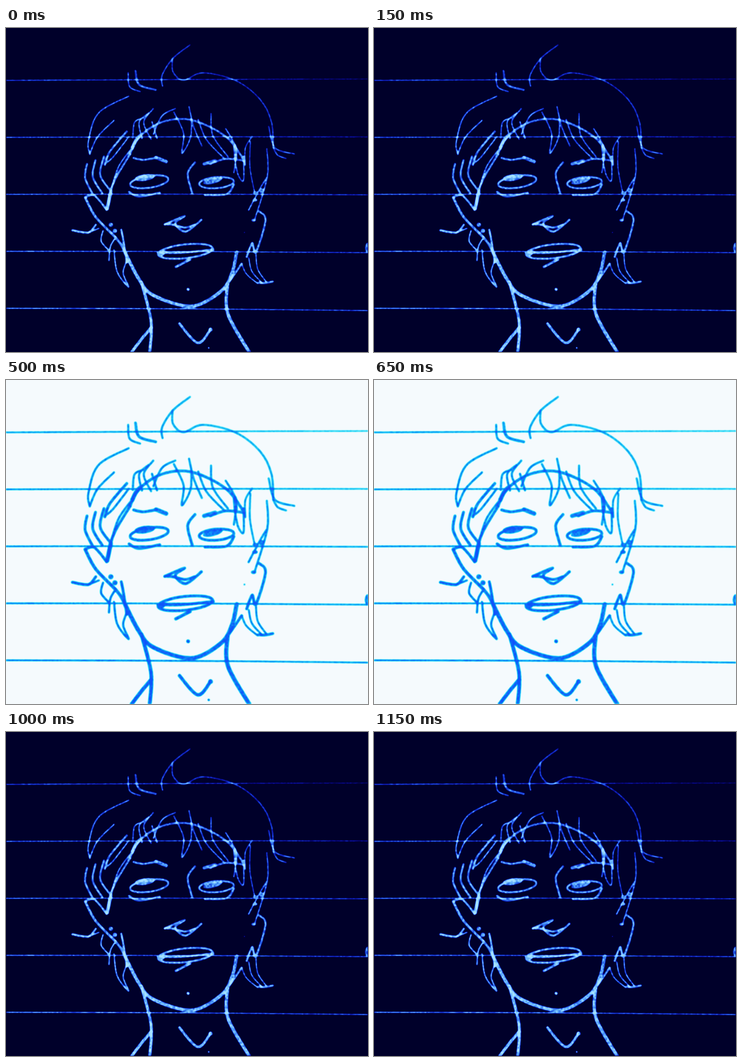
An HTML page with a canvas that plays this animation: 791x708 px, repeating every 1250 ms.

```html
<!DOCTYPE html>
<html lang="en">
<head>
<meta charset="utf-8">
<title>Ink portrait</title>
<style>
html, body { margin: 0; width: 100%; height: 100%; overflow: hidden; background: #00002a; }
canvas { display: block; width: 791px; height: 708px; }
</style>
</head>
<body>
<canvas id="stage" width="791" height="708"></canvas>
<script>
const W = 791, H = 708, BEAT = 250;
const FINE = 4.5, MEDIUM = 6, BOLD = 9;
const lerp = (a, b, t) => a + (b - a) * t;

function sheet() {
  const c = document.createElement('canvas');
  c.width = W;
  c.height = H;
  return c.getContext('2d');
}

// The ink is pale at the top right and strong at the bottom left
const pen = sheet();
const tone = pen.createLinearGradient(600, 60, 250, 640);
tone.addColorStop(0, 'rgba(255,255,255,.58)');
tone.addColorStop(0.3, 'rgba(255,255,255,.78)');
tone.addColorStop(1, 'rgba(255,255,255,.93)');
pen.strokeStyle = pen.fillStyle = tone;
pen.lineCap = pen.lineJoin = 'round';

// Smooth stroke through a few points: x, y, x, y, ...
function ink(width, ...xy) {
  const last = xy.length / 2 - 1;
  const at = i => xy.slice(2 * Math.max(0, Math.min(last, i))).slice(0, 2);
  pen.lineWidth = width;
  pen.beginPath();
  pen.moveTo(...at(0));
  for (let i = 0; i < last; i++) {
    const [a, b, c, d] = [at(i - 1), at(i), at(i + 1), at(i + 2)];
    pen.bezierCurveTo(
      b[0] + (c[0] - a[0]) / 6, b[1] + (c[1] - a[1]) / 6,
      c[0] - (d[0] - b[0]) / 6, c[1] - (d[1] - b[1]) / 6, c[0], c[1]);
  }
  pen.stroke();
}

// Strands spread evenly between two strokes
function fan(n, width, from, to) {
  for (let i = 0; i < n; i++) {
    ink(width, ...from.map((v, k) => lerp(v, to[k], i / (n - 1))));
  }
}

function oval(x, y, rx, ry, turn = 0) {
  pen.beginPath();
  pen.ellipse(x, y, rx, ry, turn, 0, Math.PI * 2);
}

function blot(x, y, rx, ry = rx, turn = 0) {
  oval(x, y, rx, ry, turn);
  pen.fill();
}

function ring(...shape) {
  oval(...shape);
  pen.lineWidth = MEDIUM;
  pen.stroke();
}

function drawRules() {
  for (let i = 0; i < 5; i++) {
    const y = 114.5 + 124.5 * i;
    ink(3.4, 0, y, 400, y - 2 + 0.8 * i, W, y - 3 + 2 * i);
  }
}

function drawCrown() {
  ink(FINE, 402, 37, 364, 67, 341, 104, 342, 127);
  ink(FINE, 364, 67, 365, 96, 388, 114, 430, 98, 502, 115, 556, 157, 580, 205, 584, 261);
  ink(FINE, 574, 215, 588, 262, 630, 275);
  ink(FINE, 584, 262, 594, 278, 612, 285);
  ink(FINE, 267, 98, 270, 128, 293, 139);
  ink(MEDIUM, 283, 94, 291, 124, 327, 135);
  ink(FINE, 268, 149, 202, 186, 180, 248, 183, 276);
  ink(FINE, 236, 202, 200, 238, 183, 276);
}

function drawFringe() {
  ink(MEDIUM, 271, 276, 290, 239, 340, 206, 405, 201, 480, 237, 521, 290);
  fan(3, FINE, [300, 196, 281, 206, 277, 240], [322, 176, 301, 206, 317, 243]);
  ink(FINE, 319, 205, 325, 225, 330, 241);
  ink(FINE, 370, 176, 341, 192, 322, 232);
  ink(FINE, 367, 184, 388, 230, 384, 274, 403, 240, 405, 200);
  fan(2, FINE, [400, 172, 410, 215, 428, 258], [420, 200, 438, 244, 478, 286]);
  fan(2, FINE, [448, 187, 452, 235, 485, 281], [480, 220, 502, 262, 498, 316]);
  ink(FINE, 500, 285, 507, 320, 519, 333, 519, 280);
  ink(BOLD, 292, 236, 283, 247, 276, 262);
  ink(BOLD, 500, 258, 502, 282);
}

function drawLeftHair() {
  fan(2, MEDIUM, [264, 226, 227, 270, 216, 299], [271, 276, 235, 338, 220, 397]);
  ink(FINE, 268, 238, 234, 282, 216, 297);
  ink(FINE, 275, 262, 246, 303, 229, 355);
  fan(3, MEDIUM, [177, 297, 173, 328, 190, 364], [214, 281, 206, 322, 230, 357]);
  ink(MEDIUM, 173, 370, 193, 366, 220, 397);
  ink(BOLD, 229, 357, 221, 395);
  ink(MEDIUM, 145, 442, 180, 447, 196, 430);
  ink(FINE, 182, 446, 203, 438);
  ink(FINE, 212, 443, 208, 466, 226, 487);
  ink(FINE, 240, 457, 228, 478, 225, 508);
  ink(FINE, 236, 485, 243, 533, 268, 566, 256, 536, 263, 510);
  ink(MEDIUM, 252, 441, 256, 462, 264, 512);
  blot(229, 430, 5.5);
  blot(238, 443, 5.5);
}

function drawRightHair() {
  fan(2, 4, [538, 237, 523, 262, 523, 300], [534, 248, 533, 304, 543, 358]);
  fan(3, 4, [515, 515, 525, 537, 548, 557], [546, 490, 550, 527, 570, 556]);
  ink(FINE, 570, 264, 571, 325, 543, 420);
  ink(FINE, 569, 328, 556, 349, 530, 398);
  ink(MEDIUM, 552, 400, 567, 420, 546, 490, 538, 470, 526, 500);
  ink(MEDIUM, 550, 557, 568, 557, 583, 554);
  blot(545, 360, 6, 4);
  blot(559, 356, 6);
  blot(544, 376, 6, 4);
  blot(541, 420, 6, 4);
}

function drawEyes() {
  ink(MEDIUM, 279, 284, 300, 288, 330, 283);
  ink(BOLD, 328, 283, 350, 292);
  ink(BOLD, 433, 297, 457, 290);
  ink(MEDIUM, 446, 297, 480, 286, 521, 290);
  ring(313, 336, 42, 13, -0.15);
  ring(460, 338, 38, 12, -0.08);
  blot(303, 327, 23, 8, -0.15);
  blot(452, 334, 22, 7, -0.25);
  ink(MEDIUM, 269, 358, 290, 368, 336, 360);
  ink(MEDIUM, 498, 342, 482, 363, 435, 365);
  ink(MEDIUM, 413, 294, 397, 318, 407, 361);
}

function drawMouth() {
  ink(MEDIUM, 347, 429, 390, 411, 370, 427, 393, 445, 427, 419);
  ink(MEDIUM, 347, 429, 365, 430, 392, 436, 412, 430);
  ring(392, 488, 60, 15, -0.11);
  ink(MEDIUM, 332, 491, 385, 491, 453, 484);
  blot(339, 493, 8, 6);
  ink(7, 371, 522, 402, 506);
  blot(398, 571, 4);
}

function drawJaw() {
  ink(7, 173, 370, 196, 413, 243, 462, 261, 491);
  ink(BOLD, 260, 490, 290, 548, 322, 584, 405, 608, 470, 575, 494, 535, 504, 490);
  ink(MEDIUM, 515, 515, 488, 554);
  ink(BOLD, 484, 560, 485, 625, 532, 709);
  ink(8, 296, 556, 317, 640, 314, 709);
  ink(8, 317, 655, 296, 680, 274, 709);
  ink(7, 379, 646, 419, 688, 447, 659);
  blot(447, 659, 5);
  blot(791, 480, 7, 12);
  blot(443, 699, 2.5);
  blot(521, 447, 2);
}

[drawRules, drawCrown, drawFringe, drawLeftHair, drawRightHair,
  drawEyes, drawMouth, drawJaw].forEach(f => f());

// Soften the strokes, then read them as ink density
const soft = sheet();
soft.filter = 'blur(0.8px)';
soft.drawImage(pen.canvas, 0, 0);
const density = soft.getImageData(0, 0, W, H).data;

function hash(x, y) {
  const n = Math.sin(x * 127.1 + y * 311.7) * 43758.5453;
  return n - Math.floor(n);
}

function grain(x, y) {
  const i = Math.floor(x), j = Math.floor(y), u = x - i, v = y - j;
  return lerp(lerp(hash(i, j), hash(i + 1, j), u),
    lerp(hash(i, j + 1), hash(i + 1, j + 1), u), v);
}

// Colour by density: [density, r, g, b]
const dark = [[0, 0, 0, 42], [0.35, 0, 0, 48], [0.55, 8, 8, 145],
  [0.72, 24, 74, 220], [0.84, 85, 165, 250], [1, 165, 225, 255]];
const dusk = [[0, 96, 112, 190], [0.36, 196, 233, 245], [0.64, 190, 228, 244],
  [0.82, 120, 190, 238], [0.92, 50, 150, 231], [1, 42, 146, 230]];
const light = [[0, 245, 250, 253], [0.16, 205, 245, 252], [0.45, 50, 220, 246],
  [0.68, 18, 165, 246], [0.85, 14, 110, 248], [1, 14, 84, 250]];

function ramp(stops, d) {
  const k = Math.max(1, stops.findIndex(s => s[0] >= d));
  const a = stops[k - 1], b = stops[k];
  const t = (d - a[0]) / (b[0] - a[0]);
  return [1, 2, 3].map(n => lerp(a[n], b[n], t));
}

function tint(stops) {
  const table = Array.from({ length: 256 }, (_, i) => ramp(stops, i / 255));
  const g = sheet(), img = g.createImageData(W, H);
  for (let y = 0, q = 0; y < H; y++) {
    for (let x = 0; x < W; x++, q += 4) {
      const mottle = 0.84 + 0.32 * grain(x / 3.5, y / 3.5);
      const d = Math.min(255, Math.round(density[q + 3] * mottle));
      img.data.set([...table[d], 255], q);
    }
  }
  g.putImageData(img, 0, 0);
  return g.canvas;
}

const night = tint(dark), mid = tint(dusk), day = tint(light);
const cycle = [night, mid, day, mid, night];
const stage = document.getElementById('stage').getContext('2d');
const start = performance.now();

function draw() {
  const t = Math.max(0, performance.now() - start);
  stage.drawImage(cycle[Math.floor(t / BEAT) % cycle.length], 0, 0);
  requestAnimationFrame(draw);
}
draw();
</script>
</body>
</html>
```
